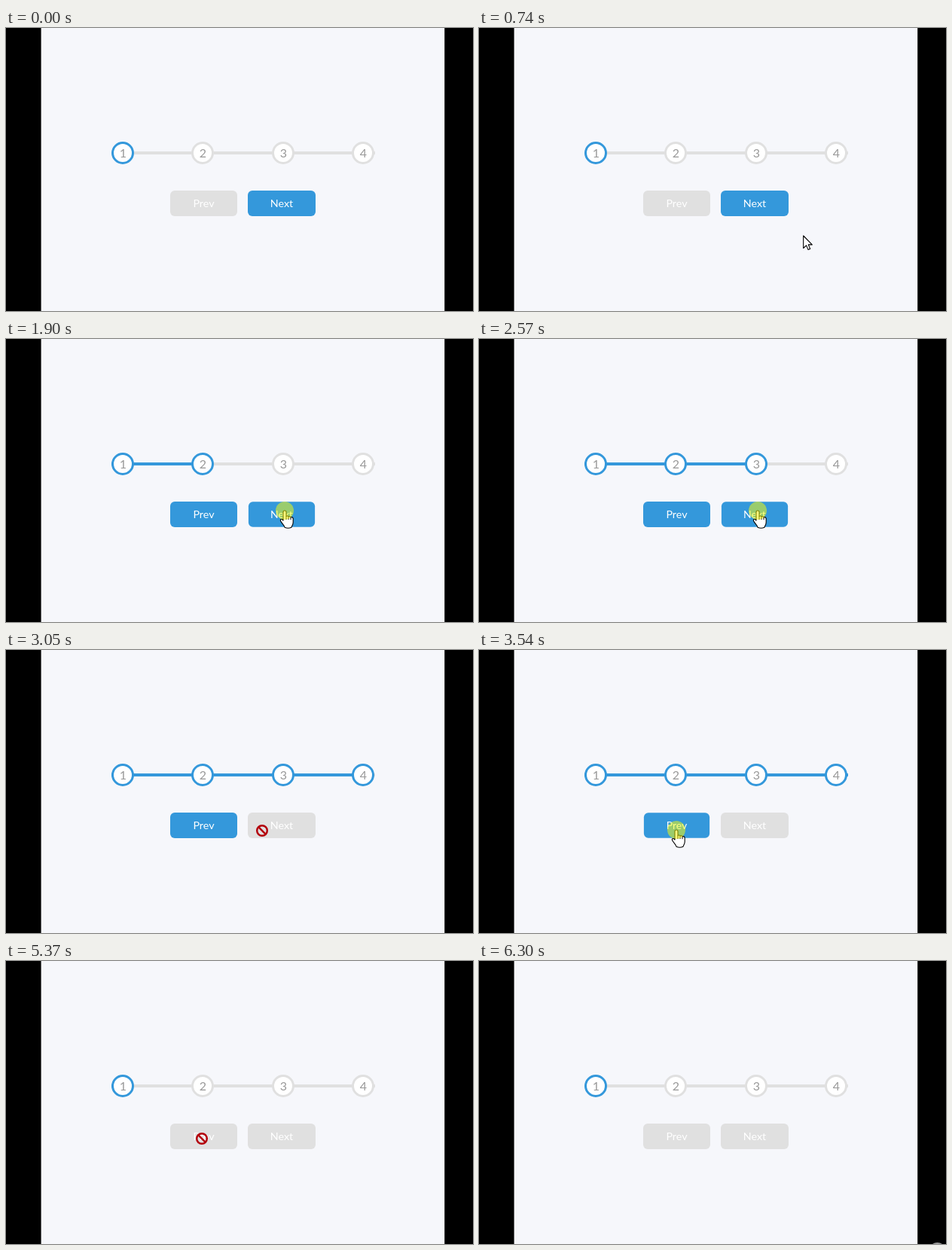
Recreate the animation shown at these times as an HTML page. Size 620x376 px, loop 6500 ms.

```html
<!DOCTYPE html>
<html lang="en">
<head>
<meta charset="utf-8">
<title>Progress steps</title>
<style>
  html, body { margin: 0; width: 100%; height: 100%; overflow: hidden; background: #000; }
  svg { display: block; width: 620px; height: 376px; }
  text { font-family: Lato, "Open Sans", sans-serif; text-anchor: middle; }
  .step circle { fill: #fff; stroke: #e0e0e0; stroke-width: 3; }
  .step.on circle { stroke: #3498db; }
  .step text { fill: #999; font-size: 16px; }
  .btn { fill: #3498db; transform-box: fill-box; transform-origin: center; }
  .btn.off { fill: #e0e0e0; }
  .btn.down { transform: scale(.98); }
  .btn text { fill: #fff; font-size: 14.3px; }
  .outline { fill: #fff; stroke: #000; stroke-width: 1.1; stroke-linejoin: round; }
</style>
</head>
<body>
<svg viewBox="0 0 620 376">
  <rect width="620" height="376" fill="#000"/>
  <rect x="46.6" width="535.6" height="376" fill="#f6f7fb"/>
  <rect x="140" y="164" width="350" height="4" fill="#e0e0e0"/>
  <rect id="bar" x="140" y="164" height="4" fill="#3498db"/>
  <g id="steps"></g>
  <g id="prev" class="btn">
    <rect x="218" y="216" width="89" height="34" rx="6"/>
    <text x="262.5" y="238">Prev</text>
  </g>
  <g id="next" class="btn">
    <rect x="321" y="216" width="90" height="34" rx="6"/>
    <text x="366" y="238">Next</text>
  </g>
  <g id="cursor">
    <path id="arrow" class="outline" d="M0 0V16.5L3.9 12.9 6.4 18.6 9 17.5 6.6 11.9H11.6Z"/>
    <g id="hand">
      <path class="outline" d="M-2 2a2 2 0 0 1 4 0V7.6Q4 6.2 5 8Q7.4 7 8 8.8Q10.6 8.2 11.2 10.5V15.5C11.2 19 9.4 20 9 22.2Q4.500 24.400 0 22.200C-.4 19.500 -3 18 -5.300 14Q-6.300 11 -3.600 11.500L-2 13Z"/>
      <path d="M2 7.600v4.400M5 8v4M8 8.800v3.400" fill="none" stroke="#000"/>
    </g>
    <g id="blocked" fill="none" stroke="#b3000c" stroke-width="2.500">
      <circle r="6.800"/>
      <path d="M-4.800 -4.800L4.800 4.800"/>
    </g>
    <circle id="glow" r="12" fill="#ff0" fill-opacity=".5"/>
  </g>
  <circle id="dot" cx="608.500" cy="385.500" r="11.500" fill="#999"/>
</svg>
<script>
const LOOP = 6500, TICK = 70, SLIDE = 400;
const $ = id => document.getElementById(id);

// press time, release time, button, step reached
const clicks = [
  [1230, 1360, 'next', 2], [1900, 2030, 'next', 3], [2570, 2770, 'next', 4],
  [3540, 3690, 'prev', 3], [4090, 4220, 'prev', 2], [4960, 5160, 'prev', 1]
];

// time, x, y of the pointer tip
const path = [
  [390, 571, 360], [600, 488, 308], [810, 402, 260], [950, 375, 242],
  [1020, 371, 236], [1160, 370, 228], [2900, 370, 228], [3050, 340, 240],
  [3260, 280, 248], [3400, 263, 244], [3540, 262, 239], [4080, 262, 239],
  [4150, 260, 236], [5630, 260, 236], [5700, 330, 276], [5770, 469, 335]
];

// the picture ticks afresh from each of these moments
const beats = [0, 390, ...clicks.flatMap(c => c.slice(0, 2)), 5700, 6300];

$('steps').innerHTML = [155, 261, 368, 474].map((x, i) =>
  `<g class="step"><circle cx="${x}" cy="166" r="13.5"/>` +
  `<text x="${x + .3}" y="172">${i + 1}</text></g>`).join('');
const steps = [...document.querySelectorAll('.step')];

const lerp = (a, b, k) => a + (b - a) * k;
const show = (id, on) => $(id).setAttribute('visibility', on ? 'visible' : 'hidden');

// cubic-bezier(.25, .1, .25, 1)
function ease(x) {
  if (x <= 0 || x >= 1) return x <= 0 ? 0 : 1;
  const curve = (a, b, u) => 3 * a * u * (1 - u) ** 2 + 3 * b * u * u * (1 - u) + u ** 3;
  let lo = 0, hi = 1;
  for (let i = 0; i < 20; i++) {
    const mid = (lo + hi) / 2;
    if (curve(.25, .25, mid) < x) lo = mid; else hi = mid;
  }
  return curve(.1, 1, lo);
}

function pointerAt(t) {
  const i = path.findIndex(p => p[0] > t);
  if (i < 1) return path.at(i < 0 ? -1 : 0).slice(1);
  const [a, b] = [path[i - 1], path[i]], k = (t - a[0]) / (b[0] - a[0]);
  return [lerp(a[1], b[1], k), lerp(a[2], b[2], k)];
}

function render(time) {
  const beat = beats.findLast(b => b <= time);
  const t = beat + Math.floor((time - beat) / TICK) * TICK;

  let active = 1, width = 0;
  for (const [, up, , step] of clicks) {
    if (t < up) break;
    active = step;
    width = lerp(width, (step - 1) / 3 * 350, ease((t - up + 10) / SLIDE));
  }
  $('bar').setAttribute('width', width);
  steps.forEach((s, i) => s.classList.toggle('on', i < active));

  const held = clicks.find(c => t >= c[0] && t < c[1]);
  const off = { prev: active === 1, next: t >= 2770 };
  for (const id in off) {
    $(id).classList.toggle('off', off[id]);
    $(id).classList.toggle('down', !!held && held[2] === id);
  }

  const [x, y] = pointerAt(t);
  const visible = t >= 390 && t < 5840;
  const inside = (l, r) => x >= l && x <= r && y >= 216 && y <= 250;
  const over = inside(218, 307) ? 'prev' : inside(321, 411) ? 'next' : null;
  const kind = !over ? 'arrow' : off[over] ? 'blocked' : 'hand';
  $('cursor').setAttribute('transform', `translate(${x} ${y})`);
  for (const id of ['arrow', 'hand', 'blocked']) show(id, visible && id === kind);
  show('glow', !!held);
  show('dot', t >= 6300);
}

const start = performance.now();
function frame() {
  render((performance.now() - start) % LOOP);
  requestAnimationFrame(frame);
}
frame();
</script>
</body>
</html>
```
